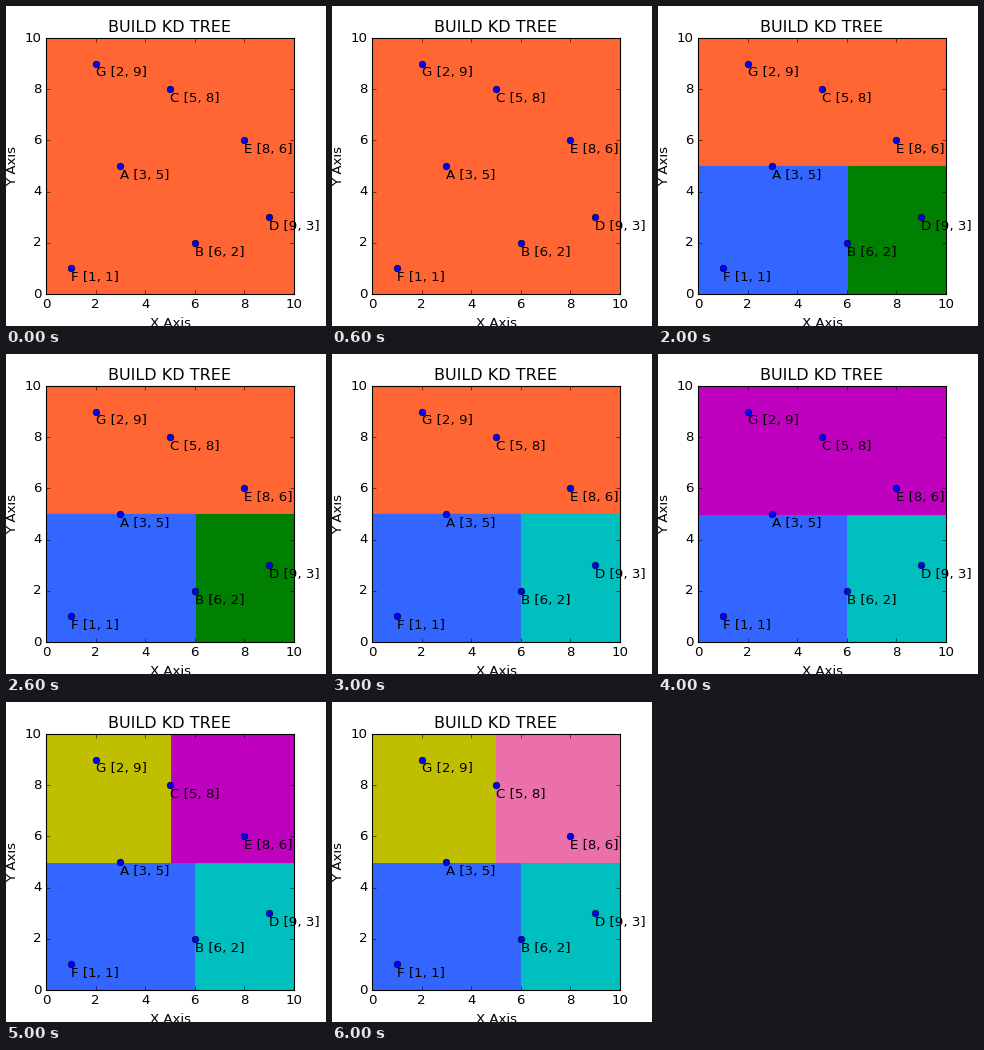
These frames come from a looping animation (320 by 320 pixels, 7000 ms). A matplotlib script:

```python
import matplotlib.pyplot as plt
from matplotlib.animation import FuncAnimation
from matplotlib.patches import Rectangle

plt.style.use("classic")
plt.rcParams.update({
    "font.family": "DejaVu Sans",
    "figure.facecolor": "white",
    "savefig.facecolor": "white",
    "savefig.dpi": "figure",
})

POINTS = {
    "A": (3, 5), "B": (6, 2), "C": (5, 8), "D": (9, 3),
    "E": (8, 6), "F": (1, 1), "G": (2, 9),
}

# Each step paints one more region: x, y, width, height, colour.
REGIONS = [
    (0, 0, 10, 10, "#ff6633"),
    (0, 0, 10, 5, "#008000"),
    (0, 0, 6, 5, "#3366ff"),
    (6, 0, 4, 5, "#00bfbf"),
    (0, 5, 10, 5, "#bf00bf"),
    (0, 5, 5, 5, "#bfbf00"),
    (5, 5, 5, 5, "#eb70aa"),
]

fig, ax = plt.subplots(figsize=(4, 4), dpi=80)
ax.set(xlim=(0, 10), ylim=(0, 10), title="BUILD KD TREE",
       xlabel="X Axis", ylabel="Y Axis")

patches = [ax.add_patch(Rectangle((x, y), w, h, color=color, linewidth=1))
           for x, y, w, h, color in REGIONS]

for name, (x, y) in POINTS.items():
    ax.plot(x, y, "o", color="blue", markersize=6,
            markeredgecolor="black", markeredgewidth=0.5)
    ax.text(x, y - 0.5, f"{name} [{x}, {y}]")


def update(step):
    for i, patch in enumerate(patches):
        patch.set_visible(i <= step)
    return patches


anim = FuncAnimation(fig, update, frames=len(REGIONS), interval=1000,
                     repeat=True, repeat_delay=0, blit=False)
plt.show()
```
